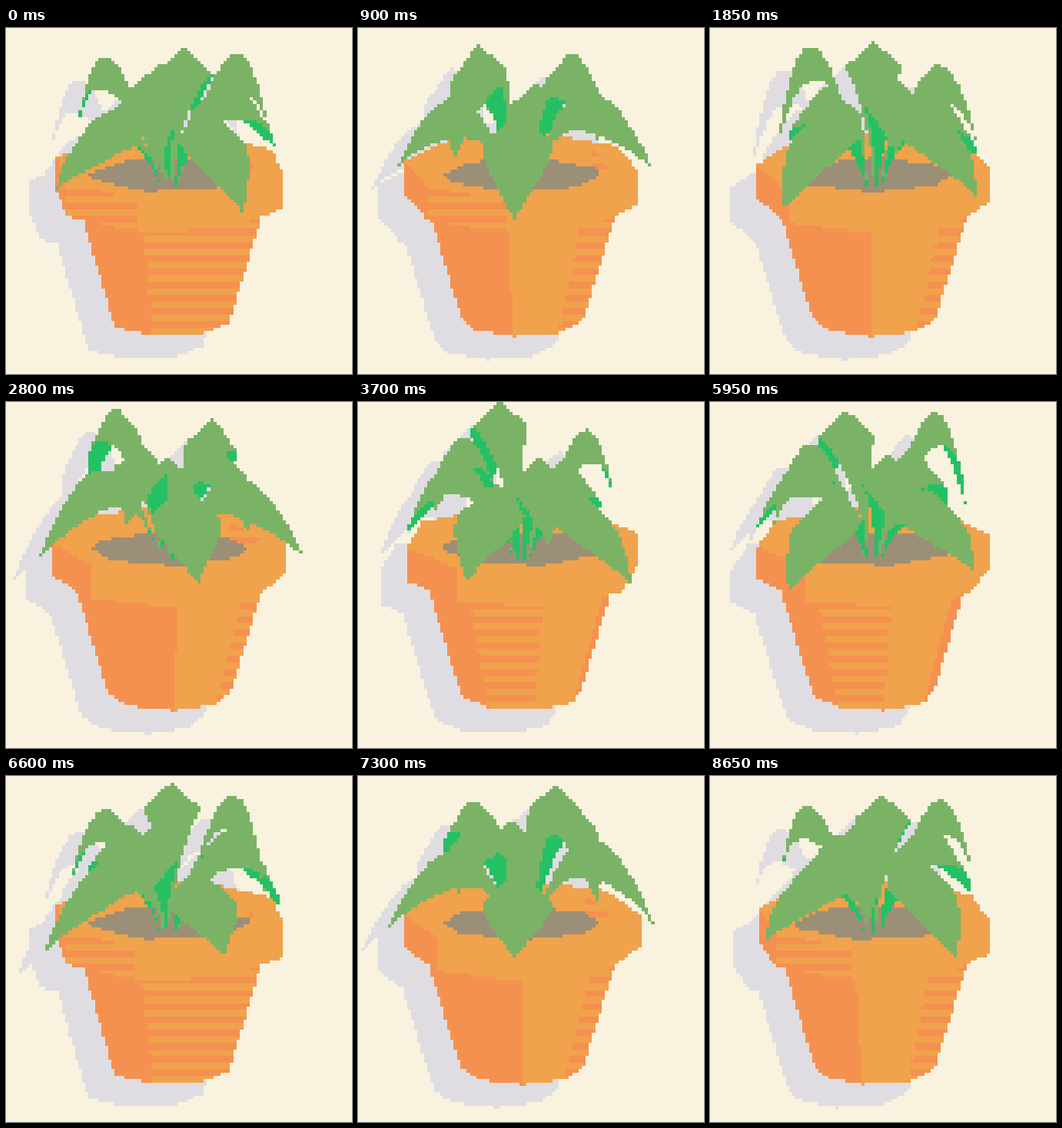
Write an HTML page with a canvas that moves like this. It is 450x450 px and loops after 8700 ms.

```html
<!DOCTYPE html>
<html>
<head>
<meta charset="utf-8">
<style>
html, body { margin: 0; height: 100%; overflow: hidden; background: #f8f2df; }
canvas { display: block; width: 100vw; height: 100vh; image-rendering: pixelated; }
</style>
</head>
<body>
<canvas id="stage" width="105" height="105"></canvas>
<script>
const N = 105, PX = 450 / N, CX = 213, RIM_Y = 180;
const SIN = 0.29, COS = 0.957, RAD = Math.PI / 180;
const LOOP = 8700, STEP = 50, TURN = -2.05, FIRST_EDGE = -16;

const rgb = hex => (0xff000000 | (hex & 255) << 16 | hex & 0xff00 | hex >> 16) >>> 0;
const [BG, SHADE, LEAF, UNDER, DARK, LIGHT, SOIL] =
  [0xf8f2df, 0xdfdde1, 0x7ab366, 0x25c064, 0xf59150, 0xf0a24c, 0x9c8f77].map(rgb);

const ctx = document.getElementById('stage').getContext('2d');
const img = ctx.createImageData(N, N);
const out = new Uint32Array(img.data.buffer);
const pix = new Uint32Array(N * N);
const depth = new Float32Array(N * N);

// angle, tip radius, tip y, peak radius, peak y, half width
const leaves = [
  [-104, 122, 129, 78, 45, 37],
  [-8, 126, 148, 78, 22, 37],
  [89, 128, 127, 78, 36, 37],
  [167, 134, 150, 78, 50, 37],
  [-64, 165, 190, 85, 98, 45],
  [33.6, 173, 199, 88, 84, 45],
  [127, 173, 188, 85, 84, 45],
  [205, 178, 206, 85, 97, 45]
];

// x right, z towards the viewer, y = screen height at z 0
function point(x, y, z) {
  return [(CX + x) / PX, (y + z * SIN) / PX, z * COS + (RIM_Y - y) / COS * SIN];
}

function ring(r, y, deg) {
  return point(r * Math.sin(deg * RAD), y, r * Math.cos(deg * RAD));
}

function cross(a, b, c) {
  return (b[0] - a[0]) * (c[1] - a[1]) - (b[1] - a[1]) * (c[0] - a[0]);
}

// a striped face uses the second colour on two rows of four
function tri(a, b, c, color, stripe = color) {
  const area = cross(a, b, c);
  if (Math.abs(area) < 1e-6) return;
  const range = i => [
    Math.max(0, Math.floor(Math.min(a[i], b[i], c[i]))),
    Math.min(N - 1, Math.ceil(Math.max(a[i], b[i], c[i])))
  ];
  const [x0, x1] = range(0), [y0, y1] = range(1);
  for (let y = y0; y <= y1; y++) {
    for (let x = x0; x <= x1; x++) {
      const p = [x + 0.5, y + 0.5];
      const u = cross(b, c, p) / area, v = cross(c, a, p) / area, w = 1 - u - v;
      if (u < 0 || v < 0 || w < 0) continue;
      const d = u * a[2] + v * b[2] + w * c[2], i = y * N + x;
      if (d <= depth[i]) continue;
      depth[i] = d;
      pix[i] = (y + 1) % 4 > 1 ? stripe : color;
    }
  }
}

function quad(a, b, c, d, ...colors) {
  tri(a, b, c, ...colors);
  tri(a, c, d, ...colors);
}

// colours of a pot face by its angle from the light
function lit(deg, bright, striped) {
  const off = Math.abs(((deg - 29) % 360 + 540) % 360 - 180);
  return off < bright ? [LIGHT] : off < striped ? [LIGHT, DARK] : [DARK];
}

function drawPot(turn) {
  for (let k = 0; k < 8; k++) {
    const a = FIRST_EDGE + turn + k * 45, b = a + 45, mid = a + 22.5;
    const wall = (r0, y0, r1, y1, colors) =>
      quad(ring(r0, y0, a), ring(r0, y0, b), ring(r1, y1, b), ring(r1, y1, a), ...colors);
    wall(128, 223, 80, 378, lit(mid, 20, 47));
    wall(153.5, 180, 153.5, 223, lit(mid, 58, 75));
    wall(153.5, 180, 117, 180, [LIGHT]);
    wall(117, 180, 117, 202, lit(mid + 180, 75, 120));
    tri(point(0, 202, 0), ring(117, 202, a), ring(117, 202, b), SOIL);
  }
}

function drawLeaf([angle, tipR, tipY, peakR, peakY, width], turn) {
  const t = (angle + turn) * RAD, sn = Math.sin(t), cs = Math.cos(t);
  const baseR = 12, baseY = 205, parts = 14;
  const curve = (s, from, mid, to) =>
    (1 - s) * (1 - s) * from + 2 * s * (1 - s) * (2 * mid - (from + to) / 2) + s * s * to;
  const at = (k, side) => {
    const s = k / parts;
    const w = width * Math.sin(Math.PI * s ** 1.3);
    const r = curve(s, baseR, peakR, tipR);
    const y = curve(s, baseY, peakY, tipY) + Math.abs(side) * w * 0.9;
    return point(r * sn + side * w * cs, y, r * cs - side * w * sn);
  };
  for (const side of [-1, 1]) {
    const face = (a, b, c) => tri(a, b, c, cross(a, b, c) * side < 0 ? LEAF : UNDER);
    for (let k = 0; k < parts; k++) {
      const a = at(k, 0), b = at(k + 1, 0), c = at(k + 1, side), d = at(k, side);
      face(a, b, c);
      face(a, c, d);
    }
  }
}

function draw(now) {
  const turn = TURN * Math.floor(now % LOOP / STEP);
  pix.fill(0);
  depth.fill(-1e9);
  drawPot(turn);
  leaves.forEach(leaf => drawLeaf(leaf, turn));
  for (let y = 0; y < N; y++) {
    for (let x = 0; x < N; x++) {
      const i = y * N + x;
      const shaded = x + 8 < N && y >= 7 && pix[i + 8 - 7 * N];
      out[i] = pix[i] || (shaded ? SHADE : BG);
    }
  }
  ctx.putImageData(img, 0, 0);
}

const start = performance.now();
function tick() {
  draw(performance.now() - start);
  requestAnimationFrame(tick);
}
tick();
</script>
</body>
</html>
```
